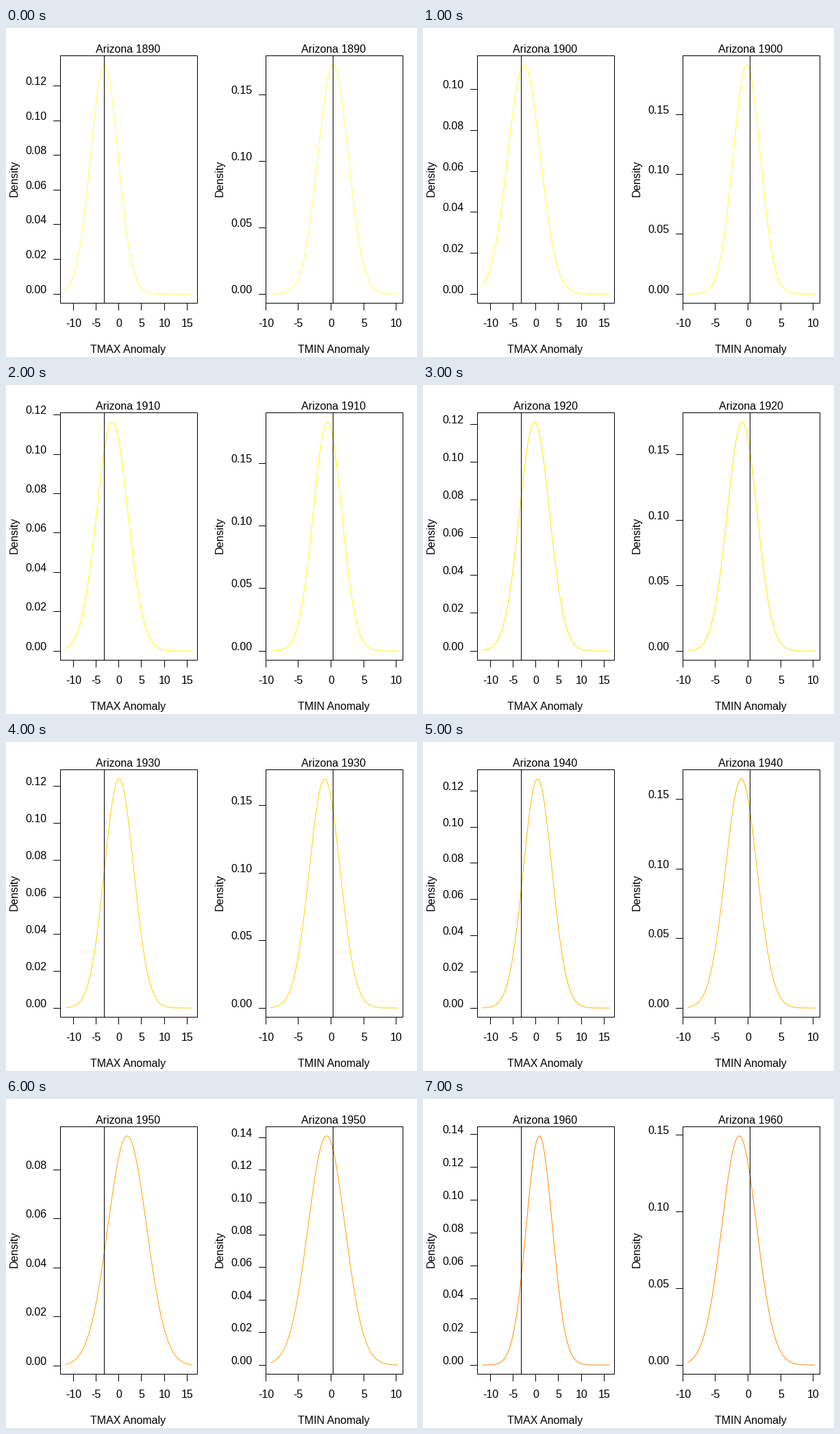
A matplotlib script that plays this animation: 600 px wide and 480 px high, repeating every 8000 ms.

```python
import math
import numpy as np
import matplotlib.pyplot as plt
from matplotlib.animation import FuncAnimation

W, H, DPI = 600, 480, 100
PX = 72 / DPI                      # one pixel in points
TOP, BOTTOM, WIDTH = 40.5, 401.5, 200
PAD = 0.04 / 1.08                  # share of the box left free at each side
Y_LOW = BOTTOM - PAD * (BOTTOM - TOP)
Y_HIGH = TOP + PAD * (BOTTOM - TOP)
FIRST_YEAR, DECADES = 1890, 8

# Key decades; those between are interpolated
KEYS = [1890, 1900, 1920, 1940, 1950, 1960]
PANELS = [
    dict(name="TMAX", left=79.5, zero=164.7, unit=6.64,
         mean=[-3.19, -2.6, -0.28, 0.4, 1.85, 0.77],
         sd=[3.02, 3.56, 3.29, 3.15, 4.25, 2.87]),
    dict(name="TMIN", left=379.5, zero=474.4, unit=9.52,
         mean=[0.33, -0.19, -0.89, -1.03, -0.68, -1.34],
         sd=[2.31, 2.08, 2.28, 2.42, 2.83, 2.67]),
]

plt.rcParams["font.family"] = "Liberation Sans"
fig = plt.figure(figsize=(W / DPI, H / DPI), dpi=DPI, facecolor="white")
ax = fig.add_axes([0, 0, 1, 1])


def heat(i):
    """Pale yellow, then yellow, then towards red."""
    return 1, min(1, (13 - i) / 11), max(0, (2 - i) / 6)


def crisp(v):
    return math.floor(v) + 0.5


def line(xs, ys, color="black"):
    ax.plot(xs, ys, color=color, lw=PX, snap=False,
            solid_capstyle="projecting", solid_joinstyle="miter")


def text(x, y, label, ha="center", rotation=0):
    ax.text(x, y, label, ha=ha, va="baseline", fontsize=16 * PX,
            rotation=rotation, rotation_mode="anchor")


def draw_panel(panel, i):
    year = FIRST_YEAR + 10 * i
    left = panel["left"]
    right = left + WIDTH
    middle = (left + right) / 2
    zero, unit = panel["zero"], panel["unit"]
    mean = np.interp(year, KEYS, panel["mean"])
    sd = np.interp(year, KEYS, panel["sd"])

    px = np.linspace(left + PAD * WIDTH, right - PAD * WIDTH, 300)
    z = ((px - zero) / unit - mean) / sd
    density = np.exp(-z * z / 2) / (sd * math.sqrt(2 * math.pi))
    low, high = density.min(), density.max()
    scale = (Y_LOW - Y_HIGH) / (high - low)

    def to_y(value):
        return Y_LOW - (value - low) * scale

    line(px, to_y(density), heat(i))
    mark = crisp(zero + panel["mean"][0] * unit)
    line([mark, mark], [TOP, BOTTOM])
    line([left, right, right, left, left], [TOP, TOP, BOTTOM, BOTTOM, TOP])

    for tick in range(-20, 21, 5):
        x = crisp(zero + tick * unit)
        if left <= x <= right:
            line([x, x], [BOTTOM, BOTTOM + 10])
            text(x, 436, str(tick))

    step = 0.05 if high > 0.144 else 0.02
    for k in range(9):
        y = crisp(to_y(k * step))
        if y > TOP:
            line([left - 10, left], [y, y])
            text(left - 19.8, y - 1.5, f"{k * step:.2f}", ha="right")

    text(middle - 1, 36, f"Arizona {year}")
    text(middle - 1, 474, f"{panel['name']} Anomaly")
    text(left - 62.3, 219.5, "Density", rotation=90)


def draw(i):
    ax.clear()
    ax.set_xlim(0, W)
    ax.set_ylim(H, 0)
    ax.axis("off")
    for panel in PANELS:
        draw_panel(panel, i)
    return []


anim = FuncAnimation(fig, draw, frames=DECADES, interval=1000,
                     repeat=True, repeat_delay=0)
plt.show()
```
